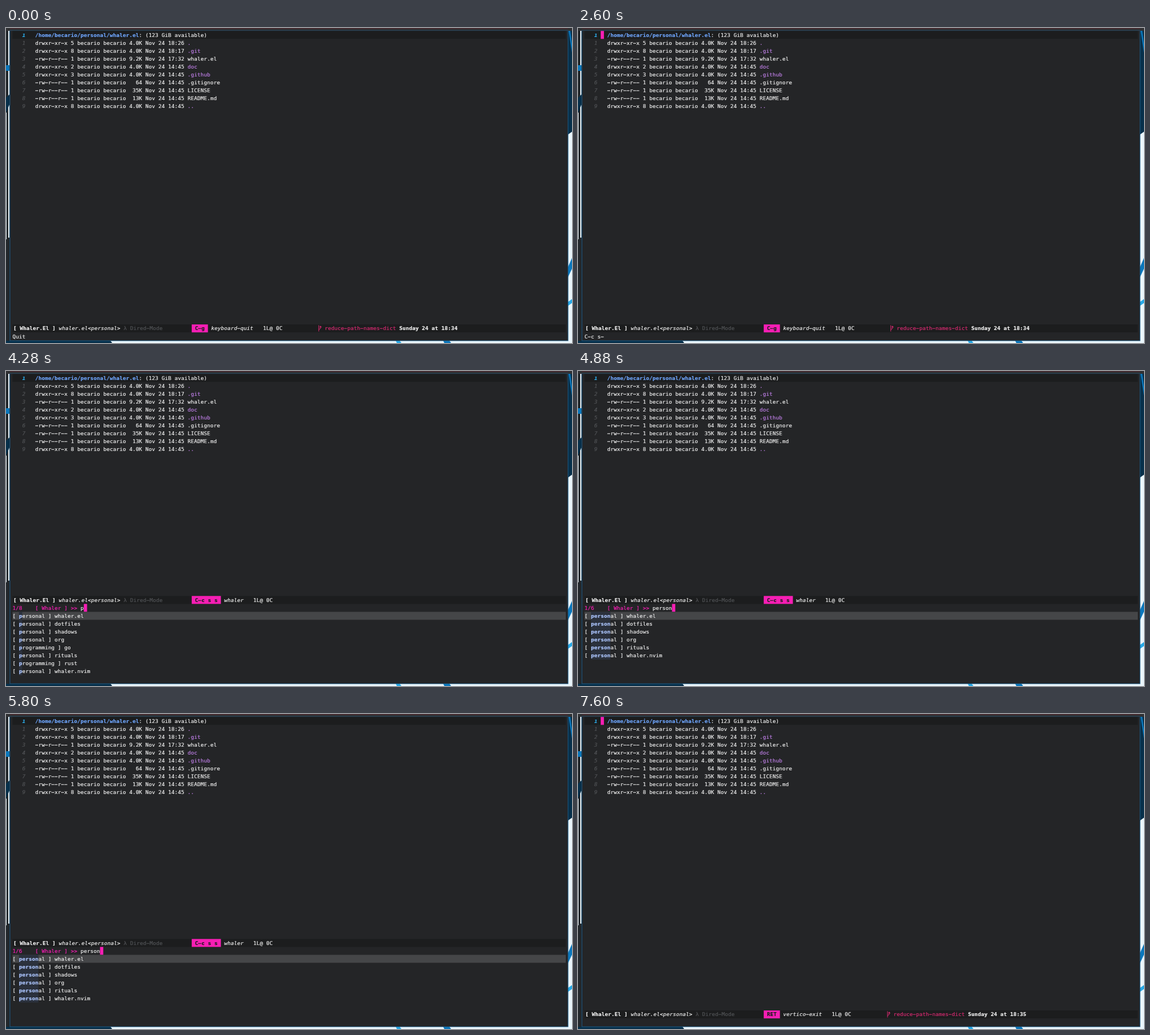
Recreate the animation shown at these times as an HTML page with a canvas. Size 1002 px wide and 559 px high, loop 8000 ms.

```html
<!DOCTYPE html>
<html lang="en">
<head>
<meta charset="utf-8">
<title>Project picker</title>
<style>
html, body { margin: 0; height: 100%; overflow: hidden; background: #242527; }
canvas { display: block; }
</style>
</head>
<body>
<canvas id="stage" width="1002" height="559"></canvas>
<script>
const ctx = document.getElementById('stage').getContext('2d');
const SCALE = 1002 / 1920, CELL = 11, ROW = 27, LEFT = 22, RIGHT = 1899, TOP = 10;
const BG = '#242527', DARK = '#1c1d1e', FG = '#eeeeee', DIM = '#515356', PINK = '#f61eb4';
const PATH_BLUE = '#6ea4fa', PURPLE = '#bd7ee4', BRANCH = '#d62a70';

const files = [
  ['drwxr-xr-x 5', '4.0K', '18:26', '.'],
  ['drwxr-xr-x 8', '4.0K', '18:17', '.git'],
  ['-rw-r--r-- 1', '9.2K', '17:32', 'whaler.el'],
  ['drwxr-xr-x 2', '4.0K', '14:45', 'doc'],
  ['drwxr-xr-x 3', '4.0K', '14:45', '.github'],
  ['-rw-r--r-- 1', '64', '14:45', '.gitignore'],
  ['-rw-r--r-- 1', '35K', '14:45', 'LICENSE'],
  ['-rw-r--r-- 1', '13K', '14:45', 'README.md'],
  ['drwxr-xr-x 8', '4.0K', '14:45', '..']
];
const projects = ['personal/whaler.el', 'personal/dotfiles', 'files/emacs', 'personal/shadows',
  'personal/org', 'programming/go', 'personal/rituals', 'programming/rust', 'personal/whaler.nvim'];

// Each step changes some fields of the state from its time onwards.
const steps = [
  [0, { cursor: false, echo: 'Quit', key: 'C-g', command: 'keyboard-quit', clock: '18:34', picker: false }],
  [400, { cursor: true }],
  [920, { cursor: false }],
  [2040, { echo: '' }],
  [2280, { echo: 'C-c-' }],
  [2600, { echo: 'C-c s-', cursor: true }],
  [2880, { picker: true, query: '', selected: 0, key: 'C-c s s', command: 'whaler' }],
  [3440, { cursor: false }],
  [4000, { cursor: true }],
  [4280, { query: 'p' }],
  [4600, { query: 'pers' }],
  [4880, { query: 'person' }],
  [5200, { selected: 1 }],
  [5800, { selected: 0 }],
  [6120, { cursor: false }],
  [6720, { picker: false, cursor: true, echo: '', key: 'RET', command: 'vertico-exit', clock: '18:35' }],
  [7000, { cursor: false }],
  [7600, { cursor: true }]
];

function rect(x, y, w, h, color) {
  ctx.fillStyle = color;
  ctx.fillRect(x, y, w, h);
}

// Writes on the character grid, with wide dashes, and returns the x after the last cell.
function text(str, x, y, color = FG, style = '') {
  ctx.font = `${style} 18px "DejaVu Sans Mono", monospace`;
  ctx.fillStyle = ctx.strokeStyle = color;
  ctx.lineWidth = 0.4;
  for (const ch of str.replaceAll('-', '−')) {
    ctx.fillText(ch, x, y + 20);
    ctx.strokeText(ch, x, y + 20);
    x += CELL;
  }
  return x;
}

function poly(color, ...points) {
  ctx.fillStyle = color;
  ctx.beginPath();
  for (const [x, y] of points) ctx.lineTo(x, y);
  ctx.fill();
}

function wallpaper() {
  const navy = '#07304b', blue = '#0b78bd', sky = '#27aae8', white = '#eaf6fc';
  rect(0, 0, 1002, 559, white);
  rect(0, 0, 1002, 5, '#303134');
  rect(7, 0, 988, 1, '#55242a');
  rect(0, 5, 7, 554, '#23282c');
  rect(0, 150, 1, 225, white);
  rect(4, 5, 2, 367, white);
  rect(0, 66, 6, 10, blue);
  poly(navy, [0, 124], [6, 118], [6, 136], [0, 151]);
  poly(navy, [0, 555], [185, 555], [188, 559], [0, 559]);
  poly(sky, [690, 555], [697, 555], [700, 559], [692, 559]);
  poly(blue, [774, 555], [785, 555], [788, 559], [776, 559]);
  poly(navy, [995, 5], [1002, 5], [1002, 184], [995, 189]);
  poly(blue, [996, 5], [999, 5], [1002, 28], [1002, 44]);
  poly(blue, [1002, 408], [1002, 427], [995, 442], [995, 424]);
  poly(sky, [1002, 481], [1002, 488], [995, 493], [995, 486]);
}

function directory(cursor) {
  rect(LEFT, TOP, RIGHT - LEFT, ROW, DARK);
  text('1', 55, TOP, '#2ba3dc', 'italic bold');
  if (cursor) rect(77, TOP, CELL, ROW, PINK);
  const x = text('/home/becario/personal/whaler.el', 99, TOP, PATH_BLUE, 'bold');
  text(': (123 GiB available)', x, TOP);
  files.forEach(([mode, size, time, name], i) => {
    const y = TOP + (i + 1) * ROW;
    text(String(i + 1), 55, y, DIM, 'italic');
    const end = text(`${mode} becario becario ${size.padStart(4)} Nov 24 ${time} `, 99, y);
    text(name, end, y, mode[0] === 'd' ? PURPLE : FG);
  });
}

function branchIcon(x, y) {
  ctx.strokeStyle = BRANCH;
  ctx.lineWidth = 2;
  ctx.stroke(new Path2D(`M${x + 2} ${y + 3}v21M${x + 2} ${y + 18}l6 -5v-6M${x + 5} ${y + 10}l3 -4l3 4`));
}

function modeLine(state, y) {
  rect(LEFT, y, RIGHT - LEFT, ROW, DARK);
  let x = text('[ Whaler.El ] ', LEFT + 3, y, FG, 'bold');
  x = text('whaler.el<personal> ', x, y, FG, 'italic');
  x = text('λ Dired-Mode', x, y, DIM) + 9 * CELL;
  const label = ` ${state.key} `;
  rect(x, y, label.length * CELL, ROW, PINK);
  x = text(label, x, y, DARK, 'bold');
  x = text(state.command, x + CELL, y, FG, 'italic');
  x = text('1L@ 0C', x + 3 * CELL, y);
  if (state.picker) return;
  x += 11 * CELL;
  branchIcon(x, y);
  x = text('reduce-path-names-dict ', x + 2 * CELL, y, BRANCH);
  text(`Sunday 24 at ${state.clock}`, x, y, FG, 'bold');
}

function picker({ query, selected, cursor }) {
  const top = 792;
  const matches = projects.filter(p => p.startsWith(query));
  let x = text(`${selected + 1}/${matches.length}    [ Whaler ] >> `, LEFT, top, PINK);
  x = text(query, x, top);
  if (cursor) rect(x, top, CELL, ROW, PINK);
  matches.forEach((project, i) => {
    const y = top + (i + 1) * ROW;
    const [group, name] = project.split('/');
    if (i === selected) rect(LEFT, y, RIGHT - LEFT, ROW, '#454648');
    const start = text('[ ', LEFT, y);
    rect(start, y, query.length * CELL, ROW, '#2b313d');
    const end = text(query, start, y, '#adc6ff', 'bold');
    text(`${group.slice(query.length)} ] ${name}`, end, y);
  });
}

function draw() {
  const time = performance.now() % 8000;
  const state = Object.assign({}, ...steps.filter(([at]) => at <= time).map(([, change]) => change));
  ctx.setTransform(1, 0, 0, 1, 0, 0);
  wallpaper();
  rect(6.5, 4.5, 989, 551, '#1c5a86');
  rect(7.5, 5, 987, 549.5, BG);
  ctx.scale(SCALE, SCALE);
  directory(state.cursor && !state.picker);
  modeLine(state, state.picker ? 765 : 1008);
  if (state.picker) picker(state);
  else text(state.echo, LEFT, 1035);
  requestAnimationFrame(draw);
}
draw();
</script>
</body>
</html>
```
